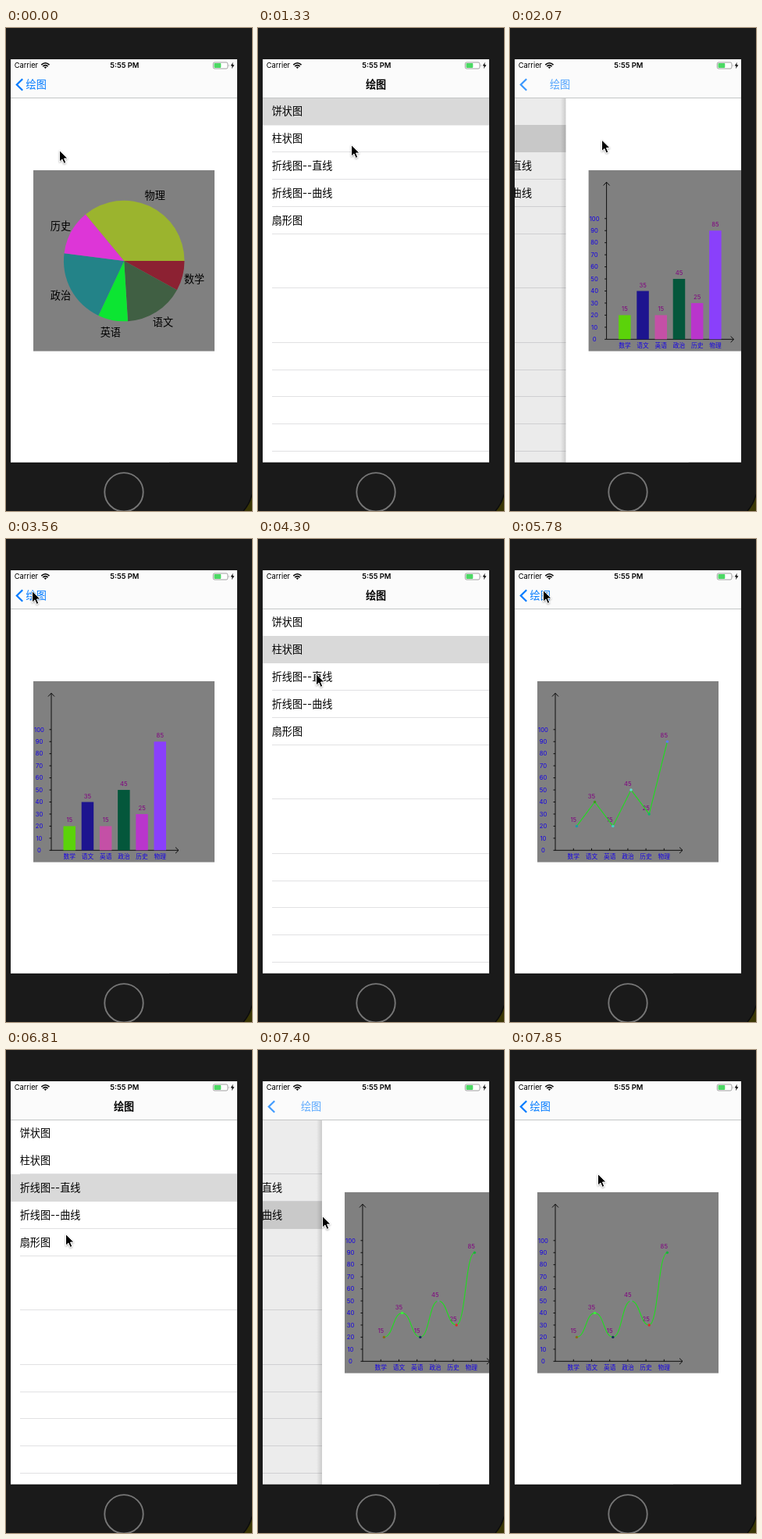
Recreate the animation shown at these times as an HTML page. Size 315x618 px, loop 8 s.

```html
<!DOCTYPE html>
<html lang="zh">
<head>
<meta charset="utf-8">
<title>绘图</title>
<style>
html, body { margin: 0; width: 100%; height: 100%; overflow: hidden; background: #1a1a1a; }
svg { display: block; width: 315px; height: 618px; }
text { font-family: Inter, "Noto Sans CJK SC", "Noto Sans CJK", sans-serif; font-size: 13.14px; }
.mid { text-anchor: middle; }
.status { font-size: 9.3px; }
.small { font-size: 7.73px; }
</style>
</head>
<body>
<svg viewBox="0 0 315 618" xmlns="http://www.w3.org/2000/svg">
  <defs>
    <clipPath id="screen"><rect x="6" y="90" width="290" height="465.5"/></clipPath>
    <linearGradient id="shade">
      <stop offset="0" stop-opacity="0"/><stop offset="1" stop-opacity=".14"/>
    </linearGradient>
    <filter id="soft" x="-50%" y="-50%" width="200%" height="200%">
      <feDropShadow dx="0" dy="1" stdDeviation=".8" flood-opacity=".35"/>
    </filter>
  </defs>

  <rect width="315" height="618" fill="#1a1a1a"/>
  <path d="M315 597Q312 609 304 618H315Z" fill="#3a3605"/>
  <path d="M315 597Q312 609 304 618" fill="none" stroke="#0c0c0c" stroke-width="1.5"/>
  <circle cx="151" cy="593.8" r="24.7" fill="none" stroke="#767676" stroke-width="1.9"/>
  <rect x="6" y="40" width="290" height="515.5" fill="#fff"/>

  <g clip-path="url(#screen)">
    <g id="list"></g>
    <rect id="dim" x="6" y="90" width="290" height="466"/>
    <g id="page">
      <rect x="-1" y="90" width="7" height="466" fill="url(#shade)"/>
      <rect x="6" y="90" width="290" height="466" fill="#fff"/>
      <rect x="35" y="182" width="232" height="231.5" fill="#808080"/>
      <g class="chart" id="pie"></g>
      <g class="chart" id="bars"></g>
      <g class="chart" id="lines"></g>
      <g class="chart" id="curve"></g>
    </g>
  </g>

  <rect x="6" y="40" width="290" height="49" fill="#fbfbfb"/>
  <rect x="6" y="89" width="290" height="1" fill="#c4c6c6"/>
  <text class="status" x="10.7" y="51.3">Carrier</text>
  <g fill="none" stroke="#000" stroke-width="1.6">
    <path d="M45.3 47.2Q50.4 42.3 55.5 47.2M47.2 49.2Q50.4 46.2 53.6 49.2"/>
    <path d="M48.7 50.2Q50.4 48.9 52.1 50.2L50.4 52Z" fill="#000" stroke="none"/>
  </g>
  <text class="status mid" x="151.8" y="51.3" font-weight="600">5:55 PM</text>
  <rect x="265.3" y="44" width="18.6" height="8" rx="1.8" fill="#fff" stroke="#8a8a8a" stroke-width=".8"/>
  <rect x="266.5" y="45.1" width="8.8" height="5.8" rx=".8" fill="#4cd964"/>
  <path d="M285 46.6Q286.3 48 285 49.4Z" fill="#8a8a8a"/>
  <path d="M290.8 43.8L287.7 48.6H289.8L289 52.3L292.4 47.2H290.2Z"/>

  <text id="title" class="mid" y="77.2" font-weight="700">绘图</text>
  <text id="back" y="77.2" fill="#007aff">绘图</text>
  <path id="chevron" d="M21.2 65.2L13.8 72.5L21.2 79.8" fill="none" stroke="#007aff" stroke-width="2.2"/>

  <g id="cursor" filter="url(#soft)">
    <path d="M.5 .6V15.2L3.9 12L6.2 17.4L8.8 16.3L6.5 11H11Z" stroke="#fff" stroke-width="1" stroke-linejoin="round"/>
  </g>
</svg>

<script>
const LOOP = 8000, TICK = LOOP / 54, SLIDE = 500;
const $ = id => document.getElementById(id);

const subjects = ["数学", "语文", "英语", "政治", "历史", "物理"];
const values = [20, 40, 20, 50, 30, 90];
const rows = ["饼状图", "柱状图", "折线图--直线", "折线图--曲线", "扇形图"];
const ROW = 34.8, X0 = 58, Y0 = 398.3, GAP = 23.2;
const yOf = v => Y0 - v * 1.545;

const label = (s, x, y, fill = "#000", cls = "mid") =>
  `<text class="${cls}" x="${x}" y="${y}" fill="${fill}">${s}</text>`;

function listView() {
  const rules = [158, 193, 228, 263, 332, 402, 437, 471, 506, 541]
    .map(y => `<rect x="18" y="${y}" width="278" height="1" fill="#e1e1e3"/>`).join("");
  return `<rect x="6" y="90" width="290" height="466" fill="#fff"/>${rules}
    <rect id="mark" x="6" width="290" height="35" fill="#d9d9d9"/>` +
    rows.map((s, i) => label(s, 17.7, 111.4 + i * ROW, "#000", "")).join("");
}

function pieChart() {
  const colors = ["#8c2132", "#405f43", "#0ce532", "#238388", "#dd36d7", "#9bb42e"];
  const cx = 151.2, cy = 298, r = 77.3;
  const at = (a, d) => [cx + d * Math.cos(a), cy + d * Math.sin(a)];
  let a = 0, slices = "", names = "";
  values.forEach((v, i) => {
    const b = a + v / 250 * 2 * Math.PI, [x, y] = at((a + b) / 2, r * 1.2);
    slices += `<path d="M${cx} ${cy}L${at(a, r)}A${r} ${r} 0 0 1 ${at(b, r)}Z" fill="${colors[i]}"/>`;
    names += label(subjects[i], x, y + 4.6);
    a = b;
  });
  return slices + names;
}

function axes(ticks) {
  let d = `M${X0} ${Y0}V197.5M54 201.5L${X0} 197.2L62 201.5M${X0} ${Y0}H220.5M217 394.5L221 ${Y0}L217 402.2`;
  let out = "";
  for (let v = 0; v <= 100; v += 10) {
    d += `M${X0 - 2.5} ${yOf(v)}H${X0}`;
    out += label(v, 42.5, yOf(v) + 2.7, "#1400e6", "mid small");
  }
  subjects.forEach((s, i) => {
    const x = 81.3 + i * GAP;
    if (ticks) d += `M${x} ${Y0}v-2.5`;
    out += label(s, x, 409, "#1400e6", "mid small");
    out += label(values[i] - 5, x, yOf(values[i]) - 5, "#800080", "mid small");
  });
  return `<path d="${d}" fill="none" stroke="#000" stroke-width=".9"/>` + out;
}

function barChart() {
  const colors = ["#5bd30a", "#1d148f", "#c450a6", "#04573b", "#b935cc", "#8a40fb"];
  return axes(false) + values.map((v, i) =>
    `<rect x="${73.5 + i * GAP}" y="${yOf(v)}" width="15.5" height="${v * 1.545}" fill="${colors[i]}"/>`).join("");
}

function plot(smooth, colors) {
  const pts = values.map((v, i) => [85.4 + i * GAP, yOf(v)]);
  const d = pts.map(([x, y], i) => {
    if (!i) return `M${x} ${y}`;
    if (!smooth) return `L${x} ${y}`;
    const [px, py] = pts[i - 1], m = (px + x) / 2;
    return `C${m} ${py} ${m} ${y} ${x} ${y}`;
  }).join("");
  const dots = pts.map(([x, y], i) => `<circle cx="${x}" cy="${y}" r="1.7" fill="${colors[i]}"/>`).join("");
  return axes(true) + `<path d="${d}" fill="none" stroke="#1fdc1f" stroke-width="1.1"/>` + dots;
}

$("list").innerHTML = listView();
$("pie").innerHTML = pieChart();
$("bars").innerHTML = barChart();
$("lines").innerHTML = plot(false, ["#1a9aa8", "#3c9a1c", "#3fd6c4", "#5fe0d0", "#12b46a", "#5a7cf0"]);
$("curve").innerHTML = plot(true, ["#8a6a14", "#3cf03c", "#14305c", "#7a8a90", "#e02a2a", "#1cb03c"]);
const charts = document.querySelectorAll(".chart");

const pops = [630, 3750, 6260], pushes = [1850, 4810, 7200], taps = [1770, 4735, 7105];

// tick, x, y
const path = [
  [0, 68, 156], [1, 46, 112], [2, 28, 75], [6, 28, 75], [7, 50, 96], [9, 119, 149],
  [10, 119, 149], [11, 117, 144], [15, 117, 142], [18, 105, 111], [19, 66, 84], [20, 36, 63],
  [21, 37, 79], [23, 37, 79], [24, 33, 66], [26, 33, 66], [27, 42, 92], [29, 74, 172],
  [30, 74, 172], [31, 74, 176], [35, 75, 176], [38, 69, 82], [39, 42, 65], [43, 42, 65],
  [44, 52, 105], [46, 76, 235], [47, 78, 222], [48, 80, 214], [50, 82, 212], [53, 112, 158]
];

function pointer(k) {
  const i = path.findIndex(p => p[0] >= k);
  if (i < 1) return path[0].slice(1);
  const [k0, x0, y0] = path[i - 1], [k1, x1, y1] = path[i], u = (k - k0) / (k1 - k0);
  return [x0 + (x1 - x0) * u, y0 + (y1 - y0) * u];
}

const passed = (times, t) => times.filter(s => t >= s).length;
const ease = u => 1 - Math.pow(1 - Math.min(1, Math.max(0, u)), 2.5);

function draw(time) {
  const k = Math.min(53, Math.floor((time % LOOP + 10) / TICK)), t = k * TICK;
  let p = 1;
  pops.forEach((s, i) => { p += ease((t - pushes[i]) / SLIDE) - ease((t - s) / SLIDE); });

  $("list").setAttribute("transform", `translate(${-87 * p})`);
  $("page").setAttribute("transform", `translate(${290 * (1 - p)})`);
  $("page").setAttribute("opacity", p > 0.001 ? 1 : 0);
  $("dim").setAttribute("opacity", 0.1 * p);
  $("mark").setAttribute("y", [89.5, 124, 159, 194][passed(taps, t)]);
  const shown = passed(pushes, t);
  charts.forEach((c, i) => c.setAttribute("display", i === shown ? "inline" : "none"));

  $("title").setAttribute("x", 151 - 112 * p);
  $("title").setAttribute("opacity", Math.max(0, 1 - 1.4 * p));
  $("back").setAttribute("x", 25.6 + 112 * (1 - p));
  $("back").setAttribute("opacity", Math.max(0, 1.4 * p - 0.4));
  $("chevron").setAttribute("opacity", p);

  const [x, y] = pointer(k);
  $("cursor").setAttribute("transform", `translate(${x} ${y})`);
}

function frame() {
  draw(performance.now());
  requestAnimationFrame(frame);
}
frame();
</script>
</body>
</html>
```
